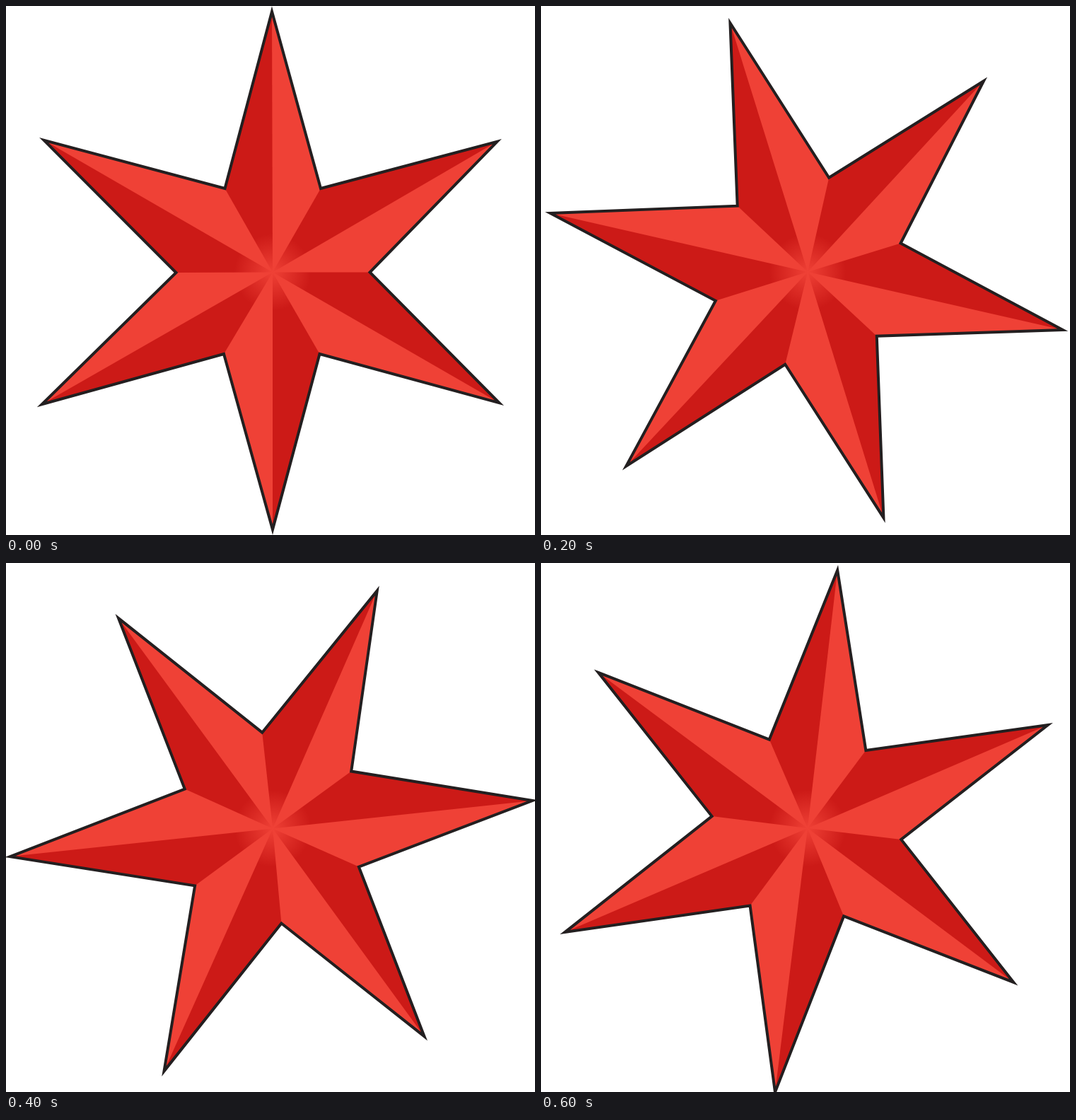
These frames come from a looping animation (748x748 px, 0.7 s). An HTML page with a canvas:

```html
<!DOCTYPE html>
<html lang="en">
<head>
<meta charset="utf-8">
<title>Spinning star</title>
<style>
  html, body { margin: 0; width: 100%; height: 100%; overflow: hidden; background: #fff; }
  canvas { display: block; }
</style>
</head>
<body>
<canvas id="stage" width="748" height="748"></canvas>
<script>
const ctx = document.getElementById('stage').getContext('2d');
const LIGHT = '#ef4136', DARK = '#cc1a17', OUTLINE = '#231f20';
const STEP = 100;
// Counter-clockwise turn in degrees for each step; 60 would repeat the pose.
const TURNS = [0, 8, 17.15, 26.85, 36.1, 44.6, 53.2];
const PIVOT = [375.5, 375.8];
const HUB = [377, 376.5];
const GLOW = 54;

// Clockwise from the top; each tip pairs with the notch that follows it.
const TIPS = [[376, 7.8], [694.4, 191.8], [697.4, 561.2], [377, 740.3], [50.7, 563.2], [53.7, 189.8]];
const NOTCHES = [[445, 258], [514.5, 376.5], [443.5, 492], [308, 492], [240.5, 377], [309.5, 258]];

function polygon(points) {
  const path = new Path2D();
  points.forEach(p => path.lineTo(...p));
  path.closePath();
  return path;
}

const star = polygon(TIPS.flatMap((tip, i) => [tip, NOTCHES[i]]));
const facets = TIPS.map((tip, i) => polygon([HUB, tip, NOTCHES[i]]));

const glow = ctx.createRadialGradient(...HUB, 0, ...HUB, GLOW);
glow.addColorStop(0, LIGHT);
glow.addColorStop(1, LIGHT + '00');

function fill(path, style) {
  ctx.fillStyle = style;
  ctx.fill(path);
}

function draw(time) {
  const turn = TURNS[Math.floor(time / STEP) % TURNS.length];
  ctx.clearRect(0, 0, 748, 748);
  ctx.save();
  ctx.translate(...PIVOT);
  ctx.rotate(-turn * Math.PI / 180);
  ctx.translate(-PIVOT[0], -PIVOT[1]);
  fill(star, DARK);
  facets.forEach(facet => fill(facet, LIGHT));
  fill(star, glow);
  ctx.strokeStyle = OUTLINE;
  ctx.lineWidth = 4;
  ctx.stroke(star);
  ctx.restore();
}

const start = performance.now();
function tick() {
  draw(performance.now() - start);
  requestAnimationFrame(tick);
}
tick();
</script>
</body>
</html>
```
